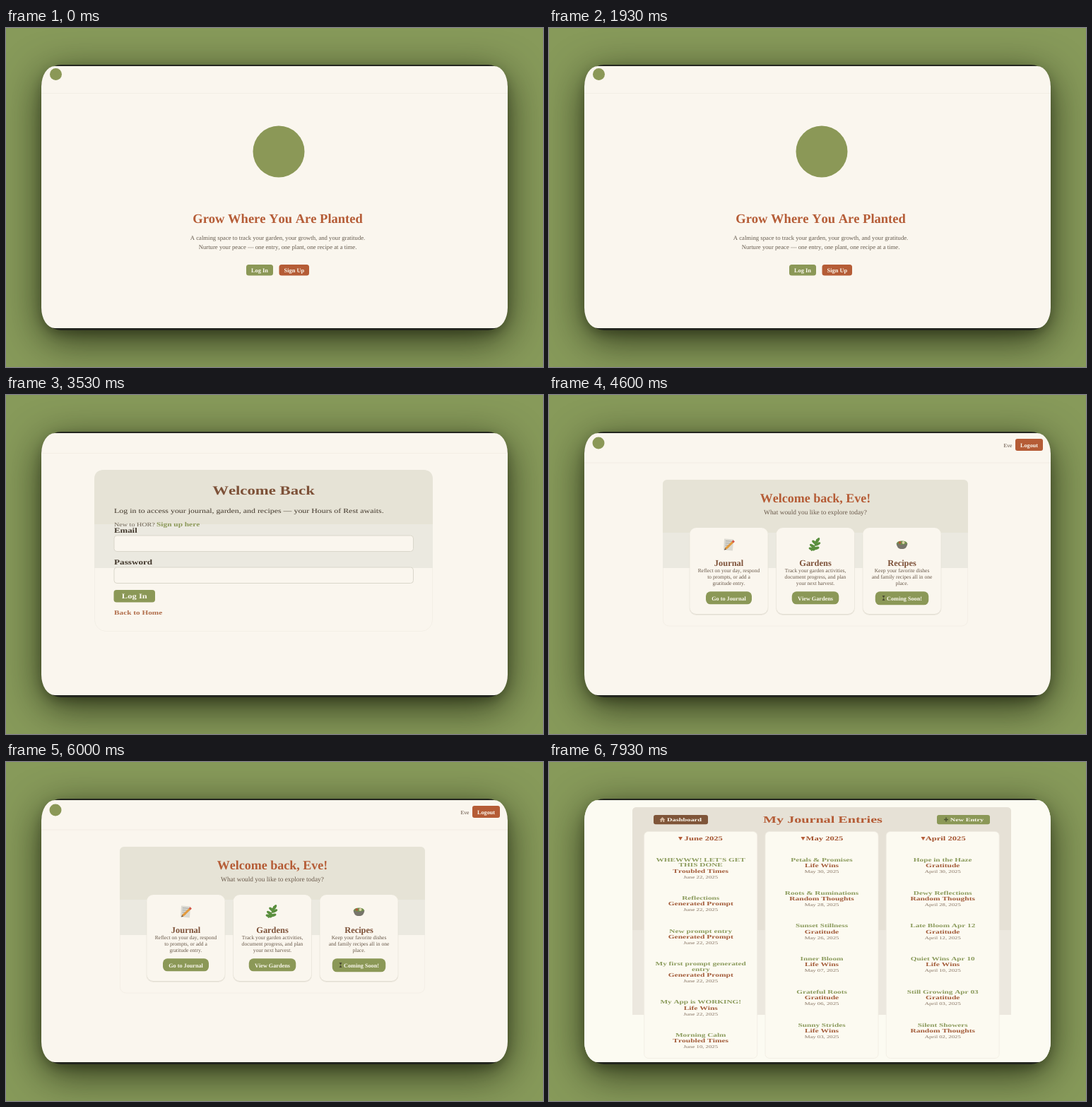
Write an HTML page that moves like this. It is 760x480 px and loops after 8 s.

```html
<!DOCTYPE html>
<html lang="en">
<head>
<meta charset="utf-8">
<title>Garden journal walkthrough</title>
<style>
html, body { margin: 0; width: 100%; height: 100%; overflow: hidden; background: #879a5a; }
.stage { position: relative; width: 760px; height: 480px; overflow: hidden; background: #879a5a; }
.frame { position: absolute; left: 50px; top: 52px; width: 660px; height: 376px; border-radius: 28px / 32px; background: #23261f;
  box-shadow: 0 14px 56px rgba(12, 16, 2, .72), 0 6px 14px rgba(12, 16, 2, .25); }
.page { position: absolute; left: 50px; top: 54px; width: 660px; height: 371px; border-radius: 19px / 29px; overflow: hidden; background: #faf6ee; }
svg { position: absolute; inset: 0; width: 660px; height: 371px; visibility: hidden; animation: 8s step-end infinite; }
text { font-family: "Liberation Serif", "Times New Roman", serif; font-kerning: none; text-rendering: geometricPrecision; white-space: pre; }
#home { animation-name: home; }
#login { animation-name: login; }
#dash { animation-name: dash; }
#journal { animation-name: journal; }
@keyframes home { 0% { visibility: visible; } 35%, 100% { visibility: hidden; } }
@keyframes login { 0% { visibility: hidden; } 35% { visibility: visible; } 50%, 100% { visibility: hidden; } }
@keyframes dash { 0% { visibility: hidden; } 50% { visibility: visible; } 95%, 100% { visibility: hidden; } }
@keyframes journal { 0% { visibility: hidden; } 95%, 100% { visibility: visible; } }
</style>
</head>
<body>
<div class="stage">
  <div class="frame"></div>
  <div class="page">
    <svg id="home" viewBox="50 54 660 371"></svg>
    <svg id="login" viewBox="50 54 660 371"></svg>
    <svg id="dash" viewBox="50 54 660 371"></svg>
    <svg id="journal" viewBox="50 54 660 371"></svg>
  </div>
</div>
<script>
const GREEN = '#8b9857', RUST = '#b55c36', BROWN = '#7d5138', PAPER = '#faf6ee', SAND = '#e6e3d6', PALE = '#ebe9e0';

const rect = (x, y, w, h, r, fill, more = '') =>
  `<rect x="${x}" y="${y}" width="${w}" height="${h}" rx="${r}" fill="${fill}" ${more}/>`;
const dot = (x, y, r) => `<circle cx="${x}" cy="${y}" r="${r}" fill="${GREEN}"/>`;
const rule = y => rect(50, y, 660, 1, 0, '#f3eee5');

// Text writer for a page drawn with horizontal scale sx
const writer = sx => (x, y, size, str, fill, { bold = true, left = false } = {}) =>
  `<text transform="translate(${x} ${y}) scale(${sx} 1)" font-size="${size}" fill="${fill}"` +
  ` font-weight="${bold ? 700 : 400}" text-anchor="${left ? 'start' : 'middle'}">${str.replace(/&/g, '&amp;')}</text>`;

// Panel that lightens in two steps on its way down
const panel = (x, y, w, mid, end, r, top = SAND, low = PALE) => {
  const shape = (bottom, fill) =>
    `<path fill="${fill}" d="M${x} ${bottom}V${y + r}q0 ${-r} ${r} ${-r}h${w - 2 * r}q${r} 0 ${r} ${r}V${bottom}z"/>`;
  return shape(end, low) + shape(mid, top);
};

const show = (id, ...parts) => document.getElementById(id).innerHTML = parts.flat().join('');
const plain = { bold: false }, left = { left: true };

function home() {
  const t = writer(1);
  show('home', dot(70.5, 65.5, 8.5), rule(92), dot(386, 175, 36.5),
    t(384.5, 276, 18.5, 'Grow Where You Are Planted', RUST),
    t(384.5, 300, 8.7, 'A calming space to track your garden, your growth, and your gratitude.', '#675d50', plain),
    t(384.5, 313, 8.7, 'Nurture your peace — one entry, one plant, one recipe at a time.', '#675d50', plain),
    rect(340, 335, 38, 15.5, 3.5, GREEN), t(359, 345.5, 8.4, 'Log In', '#fbf8ee'),
    rect(386.5, 335, 42.5, 15.5, 3.5, RUST), t(407.8, 345.5, 8.4, 'Sign Up', '#fbf8ee'));
}

function login() {
  const t = writer(1.28);
  const ink = '#40362a';
  const field = y => rect(153, y, 423.5, 22.5, 4, PAPER, 'stroke="#d9d6ca"');
  show('login', rule(82),
    rect(125.5, 106.5, 478, 228, 16, PAPER, 'stroke="#f3efe6"'),
    panel(125, 106, 479, 183, 245, 14),
    t(364.5, 140.5, 17.8, 'Welcome Back', BROWN),
    t(153, 167, 9.3, 'Log in to access your journal, garden, and recipes — your Hours of Rest awaits.', ink, { bold: false, left: true }),
    t(153, 185.5, 7.9, 'New to HOR?', '#6d6353', { bold: false, left: true }),
    t(213, 185.5, 8.9, 'Sign up here', GREEN, left),
    t(153, 194.5, 10, 'Email', ink, left), field(199),
    t(153, 239.5, 10.3, 'Password', ink, left), field(244),
    rect(152.5, 276, 58.5, 17.5, 4, GREEN), t(181.8, 288, 9.8, 'Log In', '#fbf8ee'),
    t(153, 311, 8.8, 'Back to Home', '#b06c49', left));
}

const icons = {
  memo: `<g transform="rotate(4)"><path d="M-7-8H6V8H-7z" fill="#dcdad2"/><path d="M-5-5H4M-5-2H4M-5 1H2M-5 4H0" stroke="#a3a6a5"/>
    <path d="M-4 6 6-5" stroke="#e39a3c" stroke-width="3"/><path d="M5-4l2-2" stroke="#d4574a" stroke-width="3"/><path d="M-6 8l1-3 2 2z" fill="#6b4a32"/></g>`,
  herb: `<path d="M-6 9Q-1 4 2-8" stroke="#4c7d34" fill="none"/>` +
    [[-4, 2, -55], [-1, -3, -50], [1, 5, 75], [3, -1, 65], [3, -6, 35], [-5, 6, -70]].map(([x, y, a]) =>
      `<ellipse cx="${x}" cy="${y}" rx="2" ry="4.6" transform="rotate(${a} ${x} ${y})" fill="#5a8f3e"/>`).join(''),
  salad: `<ellipse cy="-2" rx="7.5" ry="3.6" fill="#6e8d4b"/><circle cx="-3" cy="-3" r="1.8" fill="#b5573b"/><circle cx="2" cy="-3" r="2" fill="#d9d2a6"/>
    <path d="M-8-2Q0 2 8-2Q7 5 2 6H-2Q-7 5-8-2" fill="#77756b"/>`
};
const icon = (name, x, y) => `<g transform="translate(${x} ${y})">${icons[name]}</g>`;

function dash() {
  const t = writer(1);
  const cards = [
    [254.5, 'memo', 'Journal', ['Reflect on your day, respond', 'to prompts, or add a', 'gratitude entry.'], 'Go to Journal', 65],
    [377, 'herb', 'Gardens', ['Track your garden activities,', 'document progress, and plan', 'your next harvest.'], 'View Gardens', 66.5],
    [499.5, 'salad', 'Recipes', ['Keep your favorite dishes', 'and family recipes all in one', 'place.'], 'Coming Soon!', 75.5]
  ];
  const card = ([x, pic, title, lines, label, w]) => {
    const soon = pic === 'salad';
    return rect(x - 56, 189, 112, 123, 10, '#e3dfd4', 'opacity=".55"') +
      rect(x - 55.5, 189, 111, 122, 9.5, '#dcd8cc', 'opacity=".6"') +
      rect(x - 55.25, 188, 110.5, 122, 9, PAPER) + icon(pic, x, 212) +
      t(x, 241.5, 12.4, title, BROWN) +
      lines.map((s, i) => t(x, 251 + i * 9, 7.55, s, '#69594a', plain)).join('') +
      rect(x - w / 2, 278.3, w, soon ? 19 : 18, 6.5, GREEN) +
      t(x + (soon ? 3.5 : 0), 290.5, 8.2, label, '#fbf8ee') +
      (soon ? '<path d="M471.5 284h4l-2 3.5 2 3.5h-4l2-3.5z" fill="#4c4c32"/>' : '');
  };
  show('dash', dot(70, 68, 8.5), rule(95.5),
    t(649.5, 73.5, 7.6, 'Eve', '#5d4a3c', plain),
    rect(660, 62, 39, 17, 3, RUST), t(679.5, 73.5, 8.2, 'Logout', '#fbf8ee'),
    rect(161.5, 120.5, 431, 206.5, 8, PAPER, 'stroke="#f4efe6"'),
    panel(161, 120, 432, 195, 245, 7),
    t(377, 152, 18, 'Welcome back, Eve!', RUST),
    t(377, 169, 9.35, 'What would you like to explore today?', '#69594a', plain),
    cards.map(card));
}

function journal() {
  const t = writer(1.48);
  const paper = '#fcfaf1';
  const G = 'Gratitude', P = 'Generated Prompt', L = 'Life Wins', R = 'Random Thoughts', T = 'Troubled Times';
  const columns = [
    [214.7, 'June', 186, [['WHEWWW! LET\'S GET|THIS DONE', T, 22], ['Reflections', P, 22], ['New prompt entry', P, 22],
      ['My first prompt generated|entry', P, 22], ['My App is WORKING!', L, 22], ['Morning Calm', T, 10]]],
    [386, 'May', 359.5, [['Petals & Promises', L, 30], ['Roots & Ruminations', R, 28], ['Sunset Stillness', G, 26],
      ['Inner Bloom', L, '07'], ['Grateful Roots', G, '06'], ['Sunny Strides', L, '03']]],
    [557.2, 'April', 529.5, [['Hope in the Haze', G, 30], ['Dewy Reflections', R, 28], ['Late Bloom Apr 12', G, 12],
      ['Quiet Wins Apr 10', L, 10], ['Still Growing Apr 03', G, '03'], ['Silent Showers', R, '02']]]
  ];
  const column = ([x, month, tip, entries]) => {
    let y = 141;
    let out = rect(x - 80, 98.5, 160, 321, 6, paper, 'stroke="#f0ece2" stroke-width=".8"') +
      `<path d="M${tip - 3} 106h6l-3 5z" fill="${RUST}"/>` +
      t(x + 4, 111.3, 8.5, `${month} 2025`, '#a4532f');
    for (const [title, tag, day] of entries) {
      const lines = title.split('|');
      lines.forEach((s, i) => out += t(x, y + i * 7.3, 7.6, s, '#8a9a5b'));
      y += (lines.length - 1) * 7.3;
      out += t(x, y + 8.2, 7.75, tag, '#a25a38') +
        t(x, y + 16.3, 5.9, `${month} ${day}, 2025`, '#84705f', plain);
      y += 46.7;
    }
    return out;
  };
  show('journal', rect(50, 54, 660, 371, 0, '#fcfbf2'),
    panel(118, 64, 536, 238, 358, 6, '#e6e1d6', '#ece8df'),
    rect(148, 75, 77, 13.3, 3, '#7f5539'), t(191.5, 84.2, 7, 'Dashboard', '#fbf8ee'),
    '<path d="M156.5 82l4-4 4 4h-1.2v3h-5.6v-3z" fill="#d5b9a0"/><path d="M159.7 82.5h1.6v2.5h-1.6z" fill="#7f5539"/>',
    rect(549, 75, 75, 13.3, 3, GREEN), t(591.5, 84.2, 6.9, 'New Entry', '#fbf8ee'),
    '<path d="M559 81.5h6M562 78.5v6" stroke="#4d5632" stroke-width="1.5"/>',
    t(387.5, 86, 13.6, 'My Journal Entries', RUST),
    columns.map(column));
}

home();
login();
dash();
journal();
</script>
</body>
</html>
```
